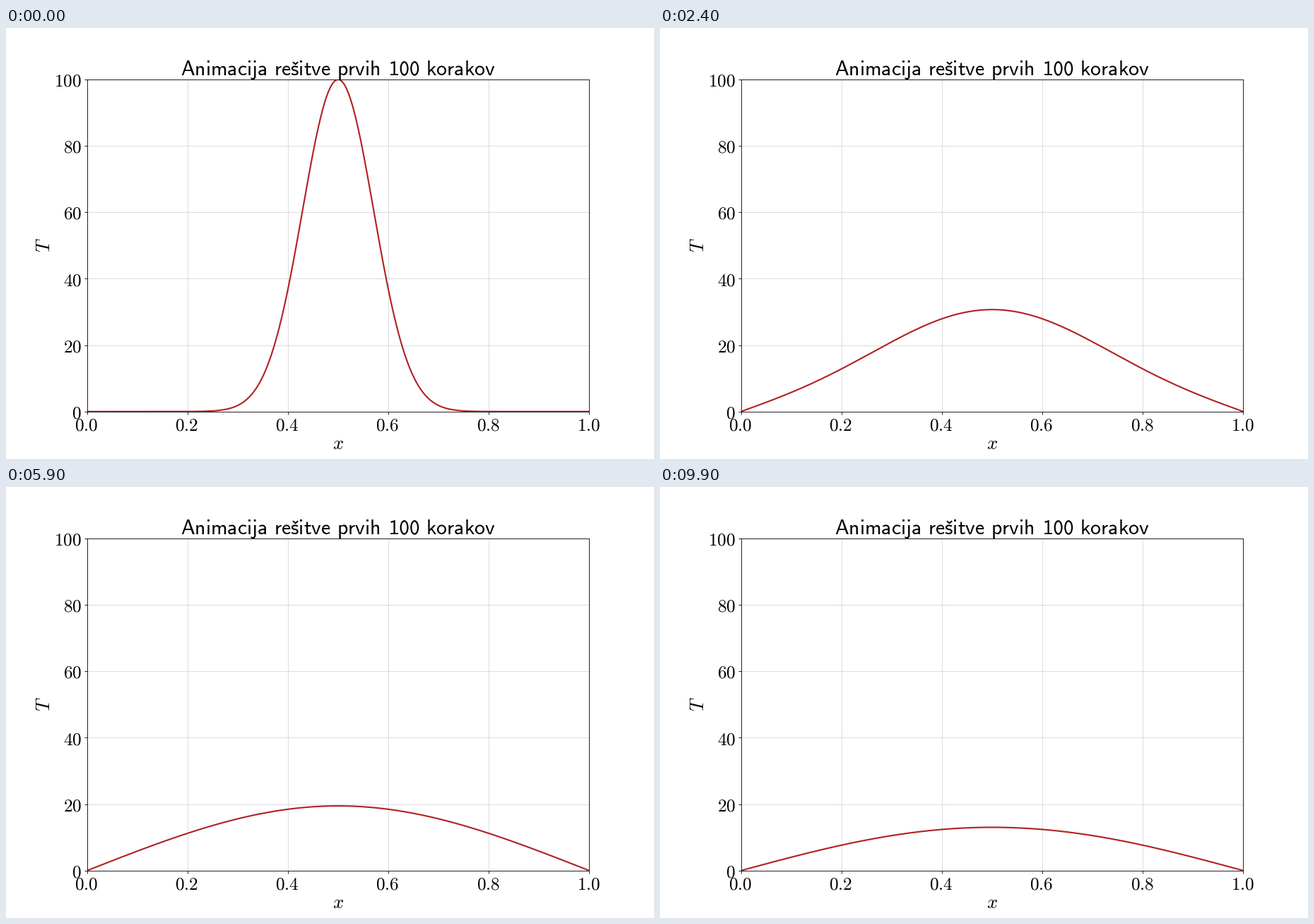
A matplotlib script for the animation above (10 s loop, 917 by 611 pixels).

```python
import numpy as np
import matplotlib.pyplot as plt
from matplotlib.animation import FuncAnimation
from matplotlib.lines import Line2D
from matplotlib.patches import Ellipse
from matplotlib.transforms import IdentityTransform

DPI = 76.42     # 12 x 8 inches give a stage of 917 x 611 pixels
W, H = 917, 611
STEPS, INTERVAL = 100, 100
VAR = 0.005     # variance of the initial Gaussian
DIFF = 0.001    # diffusion coefficient times time step

plt.rcParams["mathtext.fontset"] = "cm"

x = np.linspace(0, 1, 401)
modes = np.arange(1, 60, 2)
coef = 200 * np.sqrt(2 * np.pi * VAR) * np.sin(modes * np.pi / 2)
basis = np.sin(np.pi * np.outer(x, modes))


def temperature(step):
    """Heat equation with cold ends, as a sine series."""
    decay = np.exp(-(modes * np.pi) ** 2 * (VAR / 2 + DIFF * step))
    return basis @ (coef * decay)


fig = plt.figure(figsize=(12, 8), dpi=DPI, facecolor="white")
ax = fig.add_axes([0.125, 0.11, 0.775, 0.77])
ax.set(xlim=(0, 1), ylim=(0, 100))
ax.set_xticks(np.linspace(0, 1, 6))
ax.set_yticks(np.linspace(0, 100, 6))
ax.tick_params(labelbottom=False, labelleft=False)
ax.grid(alpha=0.5)

pixels = IdentityTransform()


def label(px, py, tex, size, ha="center", rotation=0):
    """Put math text with its baseline at a pixel position from the top left."""
    fig.text(px, H - py, f"${tex}$", fontsize=size, ha=ha, va="baseline",
             rotation=rotation, rotation_mode="anchor", transform=pixels)


def stroke(px, py, lw):
    """Draw a black polyline through pixel positions from the top left."""
    fig.add_artist(Line2D(px, H - np.array(py), transform=pixels,
                          color="black", lw=lw, solid_capstyle="butt",
                          solid_joinstyle="miter"))


left, right = 0.125 * W, 0.9 * W
top, bottom = 73.0, 543.75
for i in range(6):
    f = i / 5
    label(left + f * (right - left) - 1, 569.7, f"{f:.1f}", 23.8)
    label(107, bottom + f * (top - bottom) + 9.2, f"{20 * i}", 23.8, ha="right")

label(469.5, 597, "x", 25)
label(62, 307, "T", 25, rotation=90)

# title, with a gap for the sans-serif number that math text lacks
BASE = 67
space, gap = r"\hspace{0.379}", r"\hspace{2.466}"
words = [rf"\mathsf{{{w}}}" for w in "Animacija resitve prvih korakov".split()]
label(470, BASE, space.join(words[:3]) + gap + words[3], 28)
stroke([405.9, 409.6, 413.3], [48.2, 51.3, 48.2], 1.8)      # caron

stroke([544.6, 549.6, 549.6], [BASE - 17.2, BASE - 18.6, BASE - 1], 2.1)
stroke([544.4, 554.6], [BASE - 0.8, BASE - 0.8], 1.6)
for cx in (563.6, 578.2):
    fig.add_artist(Ellipse((cx, H - BASE + 9.6), 9.8, 18.4, fill=False,
                           ec="black", lw=2.1, transform=pixels))

curve, = ax.plot(x, temperature(0), color="firebrick", lw=2)


def update(step):
    curve.set_ydata(temperature(step))
    return curve,


anim = FuncAnimation(fig, update, frames=STEPS, interval=INTERVAL, repeat=True)
plt.show()
```
